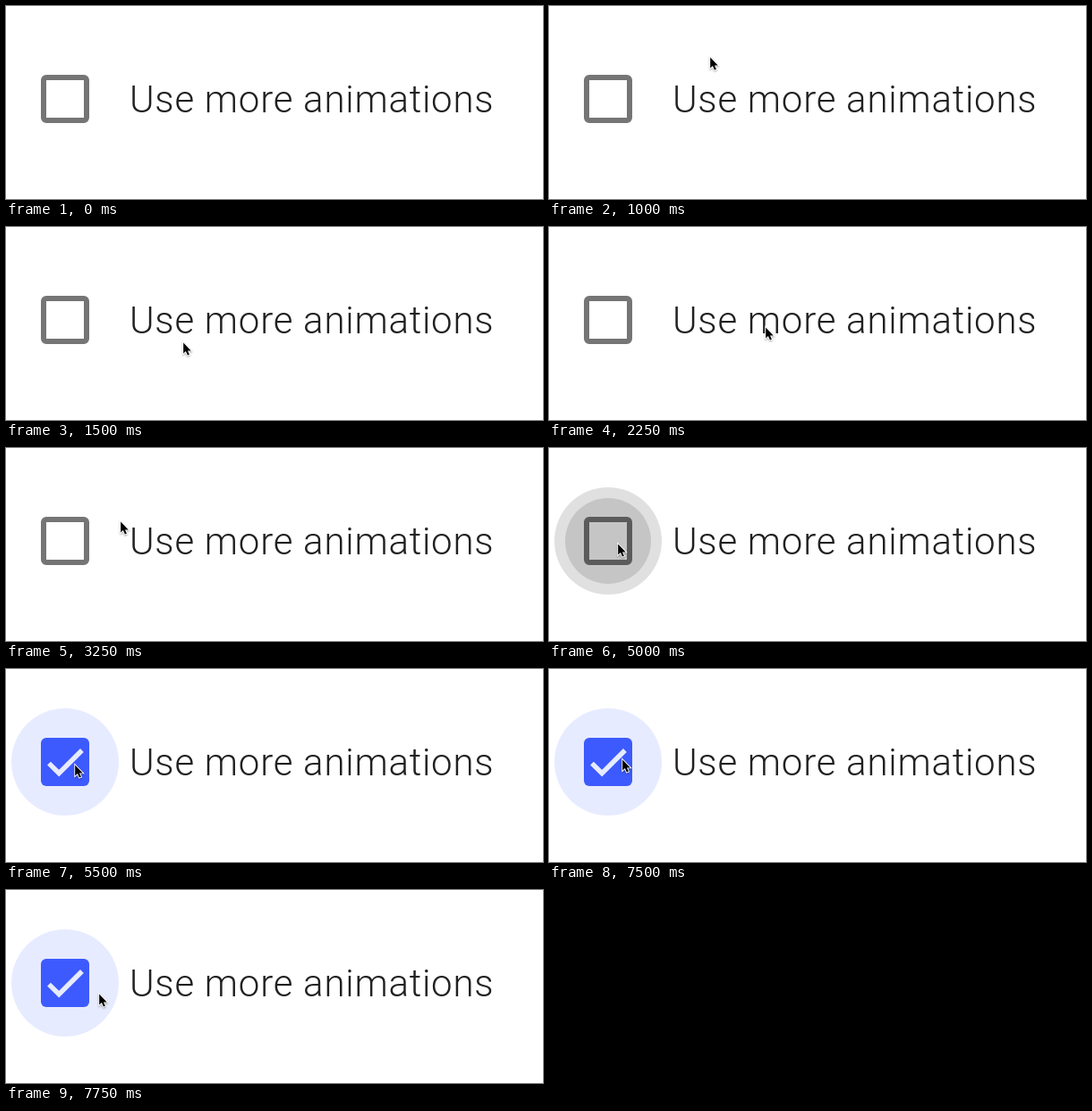
Animation, 600 px wide and 216 px high, one loop 8000 ms. Source, as an HTML page with a canvas:

```html
<!DOCTYPE html>
<html lang="en">
<head>
<meta charset="utf-8">
<title>Checkbox</title>
<style>
  html, body { margin: 0; width: 600px; height: 216px; overflow: hidden; background: #fff; }
  svg, canvas { position: absolute; left: 0; top: 0; width: 600px; height: 216px; }
  text { font: 300 42px Roboto, sans-serif; letter-spacing: 0.75px; fill: #212121; }
</style>
</head>
<body>
<svg viewBox="0 0 600 216"><text x="138" y="119">Use more animations</text></svg>
<canvas id="stage"></canvas>
<script>
const LOOP = 8000, STEP = 250;
const GREY = '#757575', BLUE = '#3d5afe';
const ENTER = 500, KEY_GAP = 500, PRESS = 5000, CHECK = 5250, SETTLE = 5500, LEAVE = 7250;

// The pointer follows a smooth curve through these tips, one per KEY_GAP.
const KEYS = [
  [218, -15], [179, 56], [197, 128], [240, 127],
  [228, 93], [157, 76], [103, 90], [76, 106]
];
const BEFORE = [218, -60], REST = KEYS[KEYS.length - 1];
const EXIT_BEND = [72.5, 89.5], EXIT = [103, 115];

const canvas = document.getElementById('stage');
const ctx = canvas.getContext('2d');
const ratio = window.devicePixelRatio || 1;
canvas.width = 600 * ratio;
canvas.height = 216 * ratio;

const arrow = new Path2D('M1.2 1.6V13.6L3.9 11.1 5.9 15.6 7.9 14.7 6 10.4H9.7Z');
const tick = new Path2D('M48 105.6L59.2 116.7 84.9 91');

// Catmull-Rom interpolation between b and c.
function spline(a, b, c, d, u) {
  return b + u / 2 * (c - a + u * (2 * a - 5 * b + 4 * c - d + u * (3 * (b - c) + d - a)));
}

function bezier(a, b, c, u) {
  return a * (1 - u) ** 2 + 2 * b * u * (1 - u) + c * u * u;
}

function pointerAt(time) {
  if (time > LEAVE) {
    const u = (time - LEAVE) / (LOOP - STEP - LEAVE);
    return REST.map((v, axis) => bezier(v, EXIT_BEND[axis], EXIT[axis], u));
  }
  const place = (time - ENTER) / KEY_GAP;
  if (place < 0) return BEFORE;
  const i = Math.floor(place);
  const key = n => n < 0 ? BEFORE : KEYS[n] || REST;
  return [0, 1].map(axis =>
    spline(...[-1, 0, 1, 2].map(n => key(i + n)[axis]), place - i));
}

function stroke(color, width, path) {
  ctx.strokeStyle = color;
  ctx.lineWidth = width;
  ctx.stroke(path);
}

function drawBox(checked) {
  const box = new Path2D();
  box.roundRect(39, 77, 54, 54, 6);
  if (checked) {
    ctx.fillStyle = BLUE;
    ctx.fill(box);
    stroke('#fff', 5.46, tick);
  } else {
    box.rect(45, 83, 42, 42);
    ctx.fillStyle = GREY;
    ctx.fill(box, 'evenodd');
  }
}

function drawRipple(radius, color) {
  ctx.globalAlpha = 0.12;
  ctx.fillStyle = color;
  ctx.beginPath();
  ctx.arc(66, 104, radius, 0, Math.PI * 2);
  ctx.fill();
  ctx.globalAlpha = 1;
}

function drawPointer(time) {
  const [x, y] = pointerAt(time).map(Math.round);
  ctx.save();
  ctx.translate(x, y);
  ctx.save();
  ctx.shadowColor = 'rgba(0,0,0,.35)';
  ctx.shadowBlur = 2 * ratio;
  ctx.shadowOffsetY = ratio;
  stroke('#fff', 1.8, arrow);
  ctx.restore();
  ctx.fillStyle = '#000';
  ctx.fill(arrow);
  ctx.restore();
}

function render(now) {
  const time = Math.floor((now % LOOP) / STEP) * STEP;
  const checked = time >= CHECK;
  ctx.setTransform(ratio, 0, 0, ratio, 0, 0);
  ctx.clearRect(0, 0, 600, 216);
  drawBox(checked);
  if (time >= PRESS) {
    const color = checked ? BLUE : '#000';
    drawRipple(60, color);
    if (time < SETTLE) drawRipple(checked ? 60 : 48, color);
  }
  drawPointer(time);
}

let start;
function frame(now) {
  start ??= now;
  render(now - start);
  requestAnimationFrame(frame);
}
render(0);
requestAnimationFrame(frame);
</script>
</body>
</html>
```
